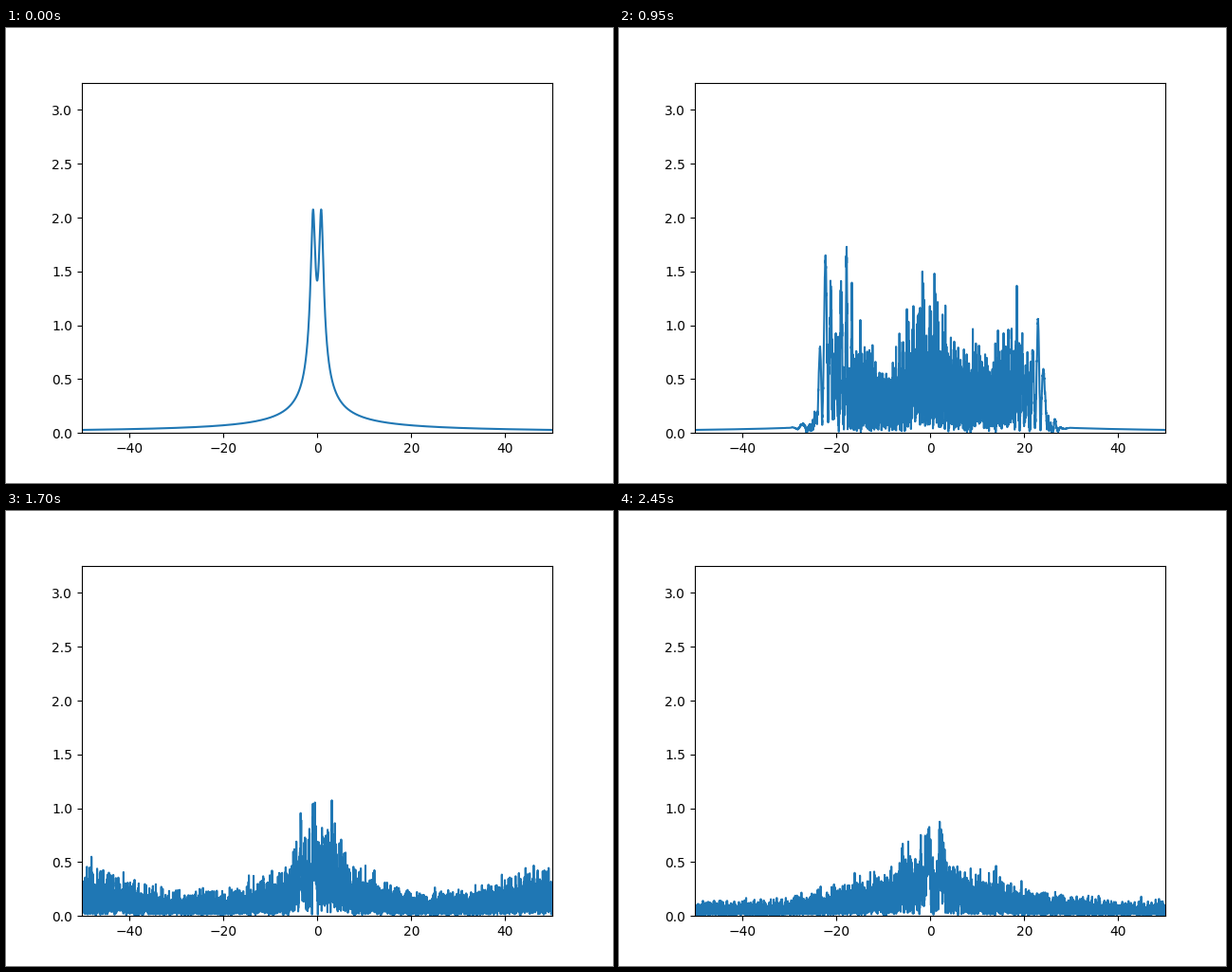
Animation, 640 px wide and 480 px high, one loop 2500 ms. Source, as a matplotlib script:

```python
import numpy as np
import matplotlib.pyplot as plt
from matplotlib.animation import FuncAnimation

FRAMES = 50
INTERVAL = 50
ONSET = 11.7    # frame at which the instability breaks out
SPEED = 3.08    # front speed, x units per frame
AGE = 7.3       # age at which noise levels are quoted

x = np.linspace(-51, 51, 10201)
r = np.abs(x)
base = np.sqrt(2 * (x**2 + 1) / (x**4 - x**2 + 1))


def step(z):
    return 1 / (1 + np.exp(-np.clip(z, -60, 60)))


def ramp(z, lo, hi):
    t = np.clip((z - lo) / (hi - lo), 0, 1)
    return t * t * (3 - 2 * t)


def noise(rng, width):
    """Complex noise of unit power, smoothed over some samples."""
    n = rng.normal(size=x.size) + 1j * rng.normal(size=x.size)
    half = int(4 * width) + 1
    kernel = np.exp(-0.5 * (np.arange(-half, half + 1) / width) ** 2)
    n = np.convolve(n, kernel, mode="same")
    return n / np.sqrt(np.mean(np.abs(n) ** 2))


def growing(frame, rng):
    """Standing wave with exponentially growing grid noise."""
    eps = 0.025 * 6.0 ** (frame - 11)
    return np.abs(base * (1 + eps * noise(rng, 0.9)))


def crests(age):
    """Evenly lagging crests that ride each front, and where they are."""
    total = np.zeros(x.size, complex)
    cover = np.zeros(x.size)
    gain = (AGE / age) ** 0.4 * min(1, age / 5) ** 2
    for side, lead, strength in ((-1, 1.04, 1.25), (1, 1.07, 0.85)):
        for i in range(7):
            pos = side * SPEED * age * (lead - 0.05 * i)
            height = strength * (1 + 0.35 * np.cos(np.pi / 2 * (i - 1)))
            height *= 1 - 0.4 * np.exp(-2 * i)
            bump = np.exp(-0.5 * ((x - pos) / (0.32 - 0.035 * i)) ** 2)
            total += gain * height * bump * np.exp(2.4j * i)
            cover = np.maximum(cover, bump)
    return total, cover


def spreading(frame, rng):
    """Dispersing noise: central hump, thin middle, two fast fronts."""
    age = frame - ONSET
    front = SPEED * age
    inside = step((front - 0.8 - r) / 0.4)
    outside = step((r - front - 1) / 0.8)

    # central hump, getting coarser with age
    width = 5.5 * (1 - np.exp(-age / 2.5))
    shape = 1 / (1 + (r / width) ** 3)
    fine_part = 0.45 + 1.7 * np.exp(-age / 10)
    hump = shape * inside * (noise(rng, 16) + fine_part * noise(rng, 1.2))
    top = 1.44 * (AGE / age) ** 0.26 + 2 * np.exp(-age / 1.8)
    hump *= top / np.abs(hump).max()

    # fine noise between hump and fronts
    low = min(0.5, 2.25 / age)
    outer = min(0.5, 0.38 * (AGE / age) ** 0.6)
    level = low + (outer - low) * ramp(r / front, 0.45, 0.7)
    wing = 0.19 * np.exp(-(r / (0.72 * age)) ** 2)
    level = np.hypot(level, wing) * np.sqrt(1 - shape**2) * inside

    crest, cover = crests(age)
    fine = level * (1 - 0.7 * cover) * noise(rng, 0.9)

    # weak foot ahead of the fronts
    foot = 0.26 * np.exp(-((r - front) / 3.2) ** 2)
    foot *= min(1, age / 3) * (AGE / age) ** 0.35 * (1 - 0.8 * cover)
    ahead = foot * (noise(rng, 22) + 0.2 * noise(rng, 0.9))

    return np.abs(base * outside + hump + fine + crest + ahead)


def wave(frame):
    rng = np.random.default_rng(100 + frame)
    return growing(frame, rng) if frame <= 12 else spreading(frame, rng)


fig, ax = plt.subplots(figsize=(6.4, 4.8), dpi=100)
ax.set_xlim(-50, 49.98)
ax.set_ylim(0, 3.254)
line, = ax.plot(x, base, color="#1f77b4", lw=1.5)


def draw(frame):
    line.set_ydata(wave(frame))
    return line,


anim = FuncAnimation(fig, draw, frames=FRAMES, interval=INTERVAL,
                     repeat=True, repeat_delay=0)
plt.show()
```
